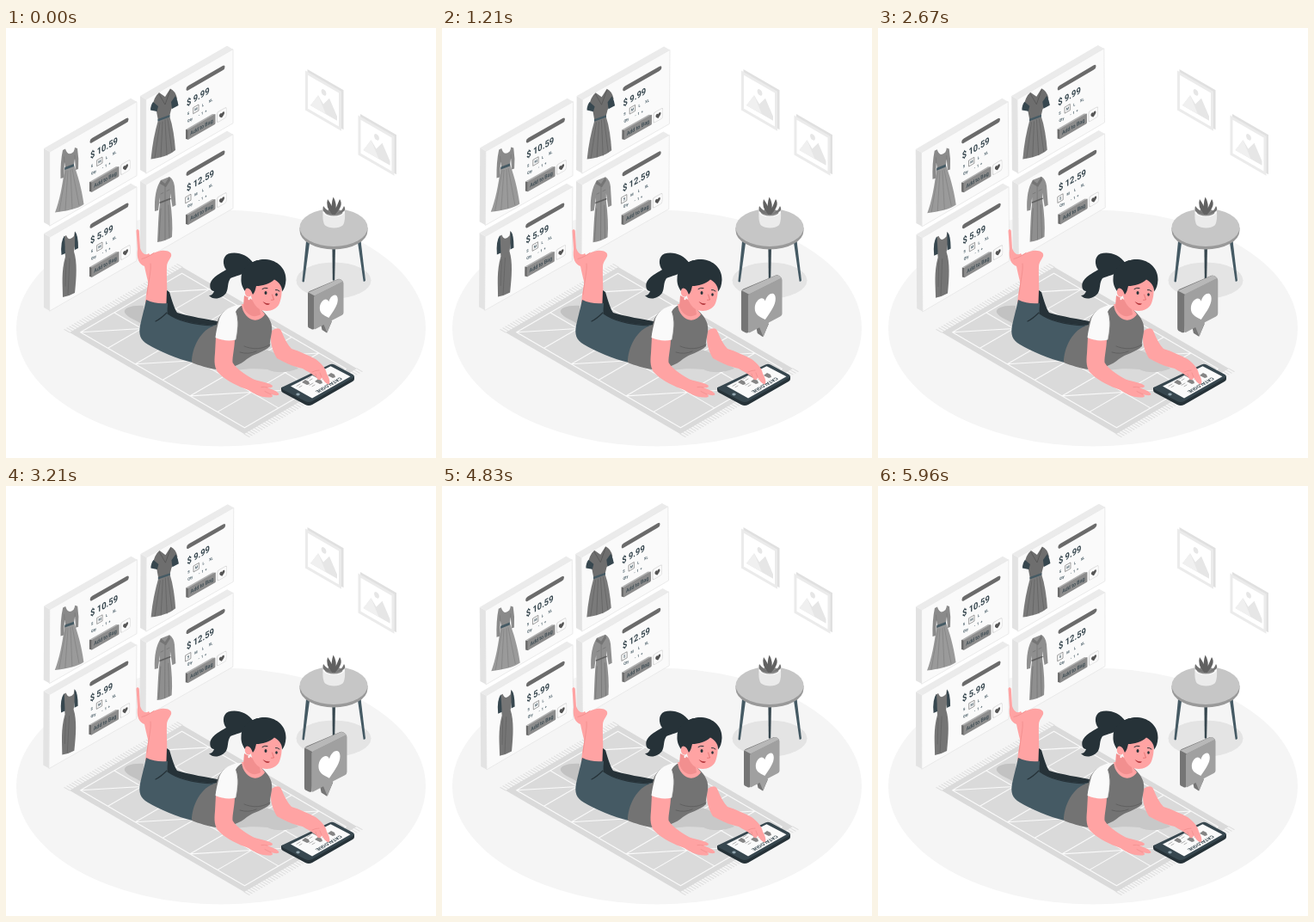
Write an HTML page with a canvas that moves like this. It is 500 px wide and 500 px high and loops after 6 s.

```html
<!DOCTYPE html>
<html lang="en">
<head>
<meta charset="utf-8">
<title>Catalogue shopping</title>
<style>
html, body { margin: 0; width: 100%; height: 100%; overflow: hidden; background: #fff; }
canvas { display: block; width: 500px; height: 500px; }
</style>
</head>
<body>
<canvas id="stage"></canvas>
<script>
const canvas = document.getElementById('stage');
const ctx = canvas.getContext('2d');
const dpr = window.devicePixelRatio || 1;
canvas.width = canvas.height = 500 * dpr;

const LOOP = 6000;
const SLOPE = 0.577;
const ISO = 0.866;
const FONT = 'Roboto, "Open Sans", sans-serif';
const SKIN = '#ffa3a3', SKIN_DARK = '#f28f8f', INK = '#263238', SLATE = '#455a64';

const fill = (color, d) => { ctx.fillStyle = color; ctx.fill(new Path2D(d)); };

function line(color, width, d) {
  ctx.strokeStyle = color;
  ctx.lineWidth = width;
  ctx.lineCap = ctx.lineJoin = 'round';
  ctx.stroke(new Path2D(d));
}

function oval(color, x, y, rx, ry) {
  ctx.fillStyle = color;
  ctx.beginPath();
  ctx.ellipse(x, y, rx, ry, 0, 0, 7);
  ctx.fill();
}

function slab(color, x, y, w, h, r) {
  ctx.fillStyle = color;
  ctx.beginPath();
  ctx.roundRect(x, y, w, h, r);
  ctx.fill();
}

function within(matrix, draw) {
  ctx.save();
  ctx.transform(...matrix);
  draw();
  ctx.restore();
}

function heart(color, x, y, w, h) {
  within([w, 0, 0, h, x, y], () =>
    fill(color, 'M0 .5C-.3 .25 -.5 .08 -.5 -.18C-.5 -.52 -.12 -.6 0 -.28C.12 -.6 .5 -.52 .5 -.18C.5 .08 .3 .25 0 .5Z'));
}

// Text squeezed by the isometric projection only
function label(text, x, y, size, color, weight = 'bold', align = 'left') {
  within([ISO, 0, 0, 1, x, y], () => {
    ctx.font = `${weight} ${size}px ${FONT}`;
    ctx.textAlign = align;
    ctx.fillStyle = color;
    ctx.fillText(text, 0, 0);
  });
}

function picture(x, y) {
  within([1, SLOPE, 0, 1, x + 2.5, y - 1.5], () => slab('#e0e0e0', 0, 0, 42, 46, 0));
  within([1, SLOPE, 0, 1, x, y], () => {
    slab('#ebebeb', 0, 0, 42, 46, 0);
    slab('#fff', 3, 3.5, 36, 39, 0);
    fill('#e6e6e6', 'M6 37L15 20L21 27L28 16L37 32V37Z');
    fill('#f0f0f0', 'M6 37L15 20L24 37Z');
    oval('#e6e6e6', 21.5, 13, 2.9, 3.4);
  });
}

function rug() {
  const at = (u, v) => `${74 + 203 * u + 131 * v} ${354 + 118 * u - 76 * v}`;
  let fringe = '', seams = '';
  for (let i = 0; i <= 44; i++) {
    const v = i / 44;
    fringe += `M${at(0, v)}L${at(-0.03, v)}M${at(1, v)}L${at(1.03, v)}`;
  }
  line('#e0e0e0', 1.1, fringe);
  fill('#dadada', `M${at(0, 0)}L${at(1, 0)}L${at(1, 1)}L${at(0, 1)}Z`);
  for (let i = 0; i < 6; i++) {
    const a = 0.03 + i * 0.157, b = a + 0.157;
    seams += `M${at(a, 0.05)}L${at(a, 0.95)}`;
    for (let j = i % 2; j < 3; j += 2) {
      const c = 0.05 + j * 0.3;
      seams += `M${at(a, c)}L${at(b, c + 0.3)}`;
    }
  }
  for (let j = 0; j < 4; j++) seams += `M${at(0.03, 0.05 + j * 0.3)}L${at(0.97, 0.05 + j * 0.3)}`;
  line('#fafafa', 1.1, seams + `M${at(0.97, 0.05)}L${at(0.97, 0.95)}`);
}

function table() {
  oval('#e4e4e4', 381, 293.5, 43.5, 21);
  fill('#37474f', 'M379.4 253H383L382.2 293Q381 294.500 379.8 293Z');
  fill(SLATE, 'M349 248L353 250L346.800 295Q345.500 296 344.400 294.500Z');
  fill(SLATE, 'M409 249L412.500 247L418 293.500Q417 295.500 415.600 294.500Z');
  fill('#999', 'M341.500 232V235.500A39.500 22 0 0 0 420.500 235.500V232Z');
  oval('#c6c6c6', 381, 232, 39.5, 22);
  fill('#ebebeb', 'M368.500 214C368 222 369 227 371 229.500C376 233.500 387 233.500 391.500 229.500C393.500 227 394.500 222 394 214Z');
  oval('#fafafa', 381.2, 214, 12.7, 5.5);
  oval('#8a8a8a', 381.2, 214.5, 10.3, 4);
  for (const [x, y] of [[369, 207], [393, 207], [374, 199], [388, 199], [380.5, 196.5]])
    fill(y > 205 ? '#737373' : '#616161', `M${x} ${y}Q${x + 5} ${y + 7} 383 216.500H379Q${x - 3} ${y + 9} ${x} ${y}Z`);
}

function bubble(scale) {
  within([scale, 0, 0, scale, 372 * (1 - scale), 323 * (1 - scale)], () => {
    fill('#757575', 'M351 309Q351 307 353 306L386 292Q388 291.500 390 293L392 295L362 314L358 350Q357 351 355 350L352 348.500Q351 348 351 346Z');
    fill('#757575', 'M366 344L367.500 351L373 354.500L379 341Z');
    fill('#b8b8b8', 'M351.500 307.500L386 292.200Q388 291.600 390 293L392 295L359 311.500Z');
    fill('#a0a0a0', 'M358 313Q358 311.500 360 310.500L390.500 295.300Q392.500 294.500 392.500 297V331Q392.500 333 390.500 334L379 340L373.500 354.500L369.500 345L360 350Q358 351 358 349Z');
    within([1, -0.47, 0, 1, 375.3, 325], () => heart('#fff', 0, 0, 21, 24));
  });
}

function flaredDress() {
  fill('#9a9a9a', 'M68 163L79 159C83 170 88 186 90.500 205C84 210 70 213 57 214.500C62 202 66 182 68 163Z');
  line('#808080', 0.7, 'M70 166L62 213M72 166L69 212M75 165L77 210M77 164L85 206');
  fill('#8a8a8a', 'M66 142L69 140.500Q72 150 78.500 144Q80 141 80 139L83 140Q85 152 84 164L81 165L80 152L79 159L69 163L68 156L67 174L63.500 175Q63 156 66 142Z');
  line('#757575', 0.6, 'M80 152L80 148M68 156L67.500 150');
  fill(SLATE, 'M68.300 162L79 158V161L68.300 165Z');
}

function vneckDress() {
  fill('#7a7a7a', 'M177 107L190 102C194 114 196 128 197 142C190 148 180 151 168.500 152.500C170 136 173 121 177 107Z');
  line('#616161', 0.7, 'M179 110L173 151M182 109L180 150M185 107L187 148M188 106L193 144');
  fill('#6e6e6e', 'M178 75L185 80L191 70.500Q197 73 199 82L192 95L190 103L177 108L175 97L170 92Q172 80 178 75Z');
  fill('#37474f', 'M171 86L177 91L175.500 97L168 95.500Q168 90 171 86ZM197 79Q200 85 200.500 90L193 94L192 86Z');
  line('#555', 0.8, 'M178 77L185 89L191 72');
  fill(SLATE, 'M176.500 106L190.500 101V103.500L176.500 108.500Z');
}

function fittedDress() {
  fill('#757575', 'M67 243L70 241Q73 249 79 242L80 236.500L82 241L79 260C83 272 82 290 80 308Q73 312 66 313C66 298 64 284 69 266Z');
  fill('#37474f', 'M68 241.500L69 262L64.500 264Q63 248 68 241.500ZM80 236.500Q84 240 84 256L80 258Z');
  line('#616161', 0.7, 'M74 268L72 310M70 270L69 300');
}

function shirtDress() {
  fill('#8f8f8f', 'M180 177L190 173Q195 176 196 184L197.500 206L193.500 208L191 192V201C193 216 194 230 193 243Q185 248 176 249C177 232 177 218 179 204V197L177 212L173 213Q172 189 180 177Z');
  fill('#757575', 'M180 177L185 181L190 173L191 177L186 185L179 181Z');
  line('#6e6e6e', 0.6, 'M185 184V246M179 204L191 199M180 193L183 191.500M187 189.500L190 188M180 210L178 247M189 206L190 244');
  line('#5e5e5e', 1.4, 'M179 203L191 198.500');
}

// Each card: front corner, price, chosen size, garment
const cards = [
  [163, 83, '$ 9.99', 1, vneckDress],
  [163, 182, '$ 12.59', 0, shirtDress],
  [51, 144, '$ 10.59', 1, flaredDress],
  [51, 243, '$ 5.99', 1, fittedDress],
];

function card([x, y, price, size, garment]) {
  within([1, -SLOPE, 0, 1, x, y], () => {
    // thickness runs 7 left and 4 up on screen
    fill('#e3e3e3', 'M0 0L-7 -8V78L0 86Z');
    fill('#ebebeb', 'M0 0L-7 -8H94L101 0Z');
    slab('#fafafa', 0, 0, 101, 86, 1);
    line('#e6e6e6', 0.7, 'M0 0H101V86H0Z');
    slab('#6b6b6b', 46.5, 12.4, 45, 5.2, 2.6);
    label(price, 47, 35.3, 10.8, '#37474f');
    [['S', 49], ['M', 58], ['L', 66], ['XL', 75]].forEach(([name, sx], i) => {
      if (i === size) {
        ctx.strokeStyle = '#757575';
        ctx.lineWidth = 0.6;
        ctx.strokeRect(sx - 3, 41.2, 6, 7);
      }
      label(name, sx, 46.2, 4.4, SLATE, 'bold', 'center');
    });
    label('Qty', 48, 54.6, 4.4, SLATE);
    label('-  1  +', 65.5, 55.2, 4.4, SLATE, 'bold', 'center');
    fill('#6b6b6b', 'M49 63.500L46 61.500V72.500L49 75Z');
    fill('#b0b0b0', 'M49 63.500L46 61.500H77L80 63.500Z');
    slab('#8c8c8c', 48.5, 63.2, 32, 11.8, 1);
    label('Add to Bag', 64.5, 71.4, 6.2, '#37474f', '500', 'center');
    slab('#d6d6d6', 82, 62.4, 11.5, 12.6, 2.2);
    slab('#fafafa', 83, 63.2, 10, 11.2, 1.8);
    heart('#555', 88, 69, 6, 6);
  });
  garment();
}

function wall(angle) {
  ctx.save();
  ctx.translate(154, 175);
  ctx.rotate(angle * Math.PI / 180);
  ctx.translate(-154, -175);
  cards.forEach(card);
  ctx.restore();
}

function tablet() {
  fill(INK, 'M320 418V421Q320 423 322 424L348 438Q352 440 356 438L403 411Q405 410 405 408V405Z');
  fill('#37474f', 'M321.500 417.500L376 391.500Q379 390 382 391.500L403.500 403Q406 405 403.500 407L356 434Q352 436 348 434L322 420.500Q319 419 321.500 417.500Z');
  fill('#fafafa', 'M331 416.500L377.500 393.300L400.500 405.300L356 430.500Z');
  oval('#90a4ae', 339.5, 426, 2.2, 1.4);
  within([-ISO, 0.5, -ISO, -0.5, 388, 406], () => {
    ctx.font = `bold 5.9px ${FONT}`;
    ctx.textAlign = 'left';
    ctx.fillStyle = '#37474f';
    ctx.fillText('CATALOGUE', 0, 0);
  });
  for (const [x, y] of [[379, 404], [364, 411], [349, 412], [361, 404]]) {
    fill('#858585', `M${x + 4} ${y + 2}L${x + 1} ${y + 3}L${x - 5} ${y}L${x - 1} ${y - 3}L${x + 3} ${y - 1}Z`);
    line('#9e9e9e', 0.8, `M${x - 7} ${y + 2}l-4 2.300M${x - 5} ${y + 4}l-3 1.700`);
  }
}

function legs() {
  fill('#c2c2c2', 'M160 323C148 322 136 325 138 331C142 338 152 339 160 346Z');
  fill(SKIN, 'M151.500 236C151.500 233.500 154.500 233.500 154.800 236L156 256C158 262 162 265 166 262C173 272 183 290 188 310L187 322L172 318C166 300 163 287 161 277C155 275 151.500 268 153 257Z');
  fill(SKIN, 'M157 269C164 267 172 260 180 259C188 258 193.500 261 192 265.500C190 270 187.500 272 187 277C186.500 290 188 306 187 324L162 320C164 298 169 286 168 275C164 276 159 274 157 269Z');
  line(SKIN_DARK, 0.9, 'M158 268.500C164 267 168 264 172 261.500M168 274C169 282 166 292 164 310');
  fill(INK, 'M187 305L190 307C193 317 196 327 199 331C215 336 232 338 250 342L246 347.500C222 348 198 344 186 333Z');
  fill(SLATE, 'M163 316C171 320 180 321 188 320C188 324 187 328 188 332C200 341 222 345 246 345.500C232 353 222 364 217 389C200 385 178 376 165 368C156 363 154 356 156 346C158 336 161 326 163 316Z');
  line(INK, 1.2, 'M187 331C182 336 178 339 174 341M188 332C200 341 222 345 240 346');
}

function head() {
  fill(INK, 'M288 274C281 263 268 259.500 258.500 262.500C251 266 252 276 256 281C250 285 240 289 237.500 297C236.500 303 239 306 242 306C241 309 239 311 236 311C241 317 251 315 256 308C259 302 257 297 261 291C267 288 275 288 281 281Z');
  fill(SKIN_DARK, 'M277 311L294 320L296 333C288 338 279 334 276 323Z');
  fill(INK, 'M273.500 291C274 278 286 269 302 269L300 290L284 304L278 306C275 302 273 297 273.500 291Z');
  oval(SKIN, 282, 307, 4.2, 5.5);
  fill(SKIN, 'M287 289C300 282 317 287 320 296C321.500 304 320.500 314 318 320C315 327.500 306 330 299 328.500C292 327 287 320 285 312Z');
  fill(INK, 'M274 290C275 278 286 269 302 269C316 270 326 280 325.500 293C325 299 324 303 321 306.500C321 300 318 296 312 292.500C306 298 298 300 291 300C290 304 289.500 307 287 310C285 304 282 301 278 303C275 300 274 296 274 290Z');
  oval(INK, 302, 308, 1.5, 1.9);
  oval(INK, 314.5, 310, 1.3, 1.8);
  line(INK, 1, 'M298 303.500Q300.500 301.500 304 302.500M313.500 304.500Q316 304 318 306');
  line('#e57373', 0.9, 'M309.500 310L311.500 316L308.500 316.300');
  fill('#b5383d', 'M298.500 318Q302 320.500 307 320.500Q303.500 324.500 298.500 318Z');
  oval('#fff', 282.5, 315, 1, 1.2);
}

function woman() {
  fill('#c8c8c8', 'M250 394C268 390 285 381 301 375C310 373 316 384 331 389L340 396C328 401 314 402 304 397C292 396 280 396 268 398Z');
  legs();
  fill(SKIN, 'M309 352C313 349 318 347.500 320 352C324 362 328 369 332 373C342 376 352 381 360 385C367 390 372 396 373 402C376.500 408 377.500 413 375 414.500C371 413 369 409 367 406.500C366 410.500 362.500 410 361 406L352 400C349 399 347 397 345 396C334 394 322 388 315 384C310 376 306 364 309 352Z');
  line(SKIN_DARK, 0.8, 'M367 406L365 401M361 406L360 402M356 400Q360 398 364 398');
  fill('#737373', 'M245 345C246 338 250 332 256 328L276 322L291 323C299 329 306 335 308.500 344C311 354 306 362 307 370C300 377 288 379 280 385C272 392 262 396 245 397C235 396 224 392 216 389C216 372 226 350 245 345Z');
  line('#5c5c5c', 0.8, 'M307 368C298 374 286 374 277 370M272 377Q282 380 291 376');
  fill(SKIN, 'M274 321C275 337 291 347 301 333L293 322Z');
  head();
  fill(SKIN, 'M244 359C251 363 260 364 266 361C266 372 263 382 263.500 389C268 397 280 404 288 408.500C296 411 304 412 309.500 415.500C311 418 308 418.500 304 418C309 420.500 316 422 317.500 426C316 428 312 427 308 426C312 428 309 430 306 429.500C296 430 288 425 282 421C270 417 256 410 248 402C242 396 242 388 243 378Z');
  line(SKIN_DARK, 0.8, 'M304 418Q300 417 297 417.500M308 426L301 422.500');
  fill('#fafafa', 'M275 322C262 322 252 328 248 338C246 346 244 354 243.500 360C251 363.500 260 364.500 267 362.500C269 352 271 340 267 330C269 326 272 324 275 322Z');
  line('#dedede', 0.7, 'M267 331C270 341 269 352 267 362');
}

// Straight-line interpolation through [position, value] pairs
function track(p, keys) {
  const i = keys.findIndex(k => k[0] > p);
  const [a, from] = keys[i - 1], [b, to] = keys[i];
  return from + (to - from) * (p - a) / (b - a);
}

const sway = [[0, 0], [0.25, 1], [0.75, -1], [1, 0]];
const beat = [[0, 1], [0.1, 1.3], [0.3, 1], [0.4, 1], [0.5, 1.3], [0.6, 1], [1, 1]];

function render(ms) {
  const t = ms % LOOP;
  ctx.setTransform(dpr, 0, 0, dpr, 0, 0);
  ctx.fillStyle = '#fff';
  ctx.fillRect(0, 0, 500, 500);
  oval('#f5f5f5', 250, 349, 238, 137.5);
  picture(348, 49.5);
  picture(409.5, 101.5);
  table();
  rug();
  wall(track(t % 3000 / 3000, sway));
  tablet();
  woman();
  bubble(track(t / LOOP, beat));
}

const start = performance.now();
function tick() {
  render(performance.now() - start);
  requestAnimationFrame(tick);
}
tick();
</script>
</body>
</html>
```
